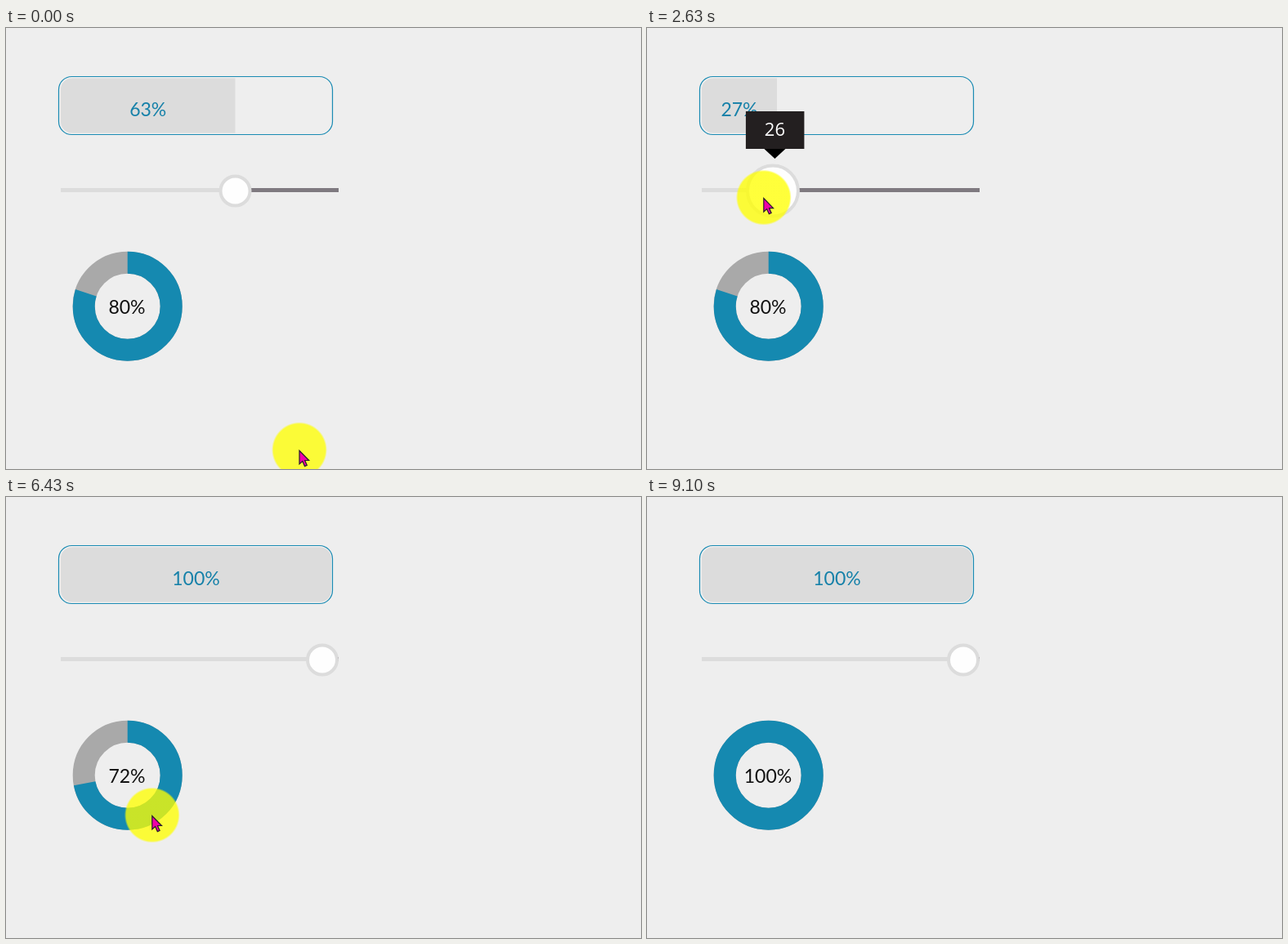
These frames come from a looping animation (777 px wide and 540 px high, 9.8 s). An HTML page:

```html
<!DOCTYPE html>
<html lang="en">
<head>
<meta charset="utf-8">
<title>Progress bar, slider and dial</title>
<style>
  html, body { margin: 0; width: 100%; height: 100%; overflow: hidden; background: #eee; }
  svg { display: block; width: 100vw; height: 100vh; }
  text { font: 23px Lato, "Open Sans", sans-serif; text-anchor: middle; }
  #tip text { font: 22px "Open Sans", "Noto Sans", sans-serif; }
</style>
</head>
<body>
<svg viewBox="0 0 777 540">
  <defs>
    <clipPath id="barClip"><rect x="67" y="61.5" width="331" height="67" rx="14"/></clipPath>
    <radialGradient id="halo">
      <stop offset=".93" stop-color="#ff0" stop-opacity=".77"/>
      <stop offset="1" stop-color="#ff0" stop-opacity="0"/>
    </radialGradient>
  </defs>

  <g clip-path="url(#barClip)"><rect id="fill" x="67" y="61" height="68" fill="#dcdcdc"/></g>
  <rect x="64.5" y="59.5" width="335" height="71" rx="16" fill="none" stroke="#1a8bb3" stroke-width="1.2"/>
  <text id="barText" y="108" fill="#1681a9"/>

  <rect x="67" y="196" width="340" height="5" fill="#7f7a80"/>
  <rect id="done" x="67" y="196" height="5" fill="#dcdcdc"/>
  <circle id="thumb" cy="199.5" fill="#fefefe" stroke="#dcdcdc" stroke-width="4"/>
  <rect id="focus" x="66.5" y="156.5" width="341.5" height="85.5" fill="none" stroke="#0c0c66" stroke-width="2.6"/>
  <g id="tip">
    <rect x="-35.5" y="-58" width="71.5" height="46" fill="#231f20"/>
    <path d="M-13 -12H13L0 0Z"/>
    <text id="tipText" y="-28" fill="#fff"/>
  </g>

  <g fill="none" stroke-width="27" transform="translate(148.7 340.7) rotate(-90)">
    <circle r="53.5" stroke="#a9a9a9"/>
    <circle id="arc" r="53.5" stroke="#1589b0" pathLength="100"/>
  </g>
  <text id="dialText" x="148" y="350" fill="#111"/>

  <g id="cursor">
    <circle cy="-.5" r="34" fill="url(#halo)"/>
    <path d="M0 .5V17L3.8 13.6L6.5 19.6L9.3 18.4L6.7 12.5H11.7Z" fill="#f000a8" stroke="#26202a" stroke-width="1.2"/>
  </g>
</svg>
<script>
const LOOP = 9800;
const TRACK_X = 67, PX_PER_VALUE = 3.4;
const THUMB_LAG = 90, TIP_LAG = 110;
const START_VALUE = 62.8;
const DIAL_GRAB = 5930, GRAB_X = 190;

const $ = id => document.getElementById(id);
const clamp = (v, lo, hi) => Math.min(hi, Math.max(lo, v));
const set = (id, attrs) => {
  for (const name in attrs) $(id).setAttribute(name, attrs[name]);
};
const visible = on => on ? "visible" : "hidden";

const linear = u => u;
const smooth = u => u * u * (3 - 2 * u);
const slowDown = u => 1 - (1 - u) ** 1.7;

// Pointer moves: start, end, x, y, easing.
const home = [359, 517];
const moves = [
  [330, 640, 335, 210, smooth],
  [640, 800, 127, 143, smooth],
  [800, 960, 283, 205, smooth],
  [1130, 1690, 159, 206, linear],
  [2500, 2820, 119.5, 211, linear],
  [3500, 3910, 420, 213, slowDown],
  [4160, 4230, 566, 248, linear],
  [4948, 5930, GRAB_X, 393, slowDown],
  [5960, 6430, 179, 390, smooth],
  [6430, 7160, 41, 391, linear],
  [7440, 8260, 262, 386, linear],
  [8930, 9100, 434, 580, linear]
];
const presses = [[1130, 1930], [2500, 3060], [3500, 4160]];

function pointer(t) {
  let [x, y] = home;
  for (const [from, to, toX, toY, ease] of moves) {
    if (t < from) break;
    const u = ease(clamp((t - from) / (to - from), 0, 1));
    x += (toX - x) * u;
    y += (toY - y) * u;
  }
  return [x, y];
}

const lastPress = t => presses.filter(([down]) => down <= t).pop();

// The slider trails the pointer and keeps its value after release.
function sliderValue(t, lag) {
  const press = lastPress(t);
  if (!press) return START_VALUE;
  const [x] = pointer(clamp(t - lag, ...press));
  return clamp((x - TRACK_X) / PX_PER_VALUE, 0, 100);
}

const valueToX = value => clamp(TRACK_X + value * PX_PER_VALUE, 87, 387);

function draw(t) {
  const released = presses.filter(([, up]) => up <= t).pop();
  const bar = released ? sliderValue(released[1], THUMB_LAG) : START_VALUE;
  const width = Math.min(331, bar * PX_PER_VALUE);
  set("fill", { width });
  set("barText", { x: TRACK_X + width / 2 });
  $("barText").textContent = Math.round(bar) + "%";

  const [down, up] = lastPress(t) || [Infinity, Infinity];
  const grow = Math.min(clamp((t - down) / 80, 0, 1), clamp(1 - (t - up) / 70, 0, 1)) || 0;
  const value = sliderValue(t, THUMB_LAG);
  const thumbX = valueToX(value);
  set("done", { width: thumbX - TRACK_X });
  set("thumb", { cx: thumbX, r: 18 + 13 * grow });
  set("focus", { visibility: visible(t >= up && t < DIAL_GRAB) });
  set("tip", {
    transform: `translate(${valueToX(sliderValue(t, TIP_LAG))} 160) scale(${grow})`,
    visibility: visible(grow > 0)
  });
  $("tipText").textContent = Math.round(value);

  const [x, y] = pointer(t);
  const dial = t < DIAL_GRAB ? 80 : Math.round(clamp(80 + (x - GRAB_X) * 0.73, 0, 100));
  set("arc", {
    "stroke-dasharray": dial === 100 ? "none" : `${dial} 200`,
    visibility: visible(dial > 0)
  });
  $("dialText").textContent = dial + "%";
  set("cursor", { transform: `translate(${x} ${y})`, visibility: visible(t < 9100) });
}

const start = performance.now();
function frame() {
  draw((performance.now() - start) % LOOP);
  requestAnimationFrame(frame);
}
frame();
</script>
</body>
</html>
```
